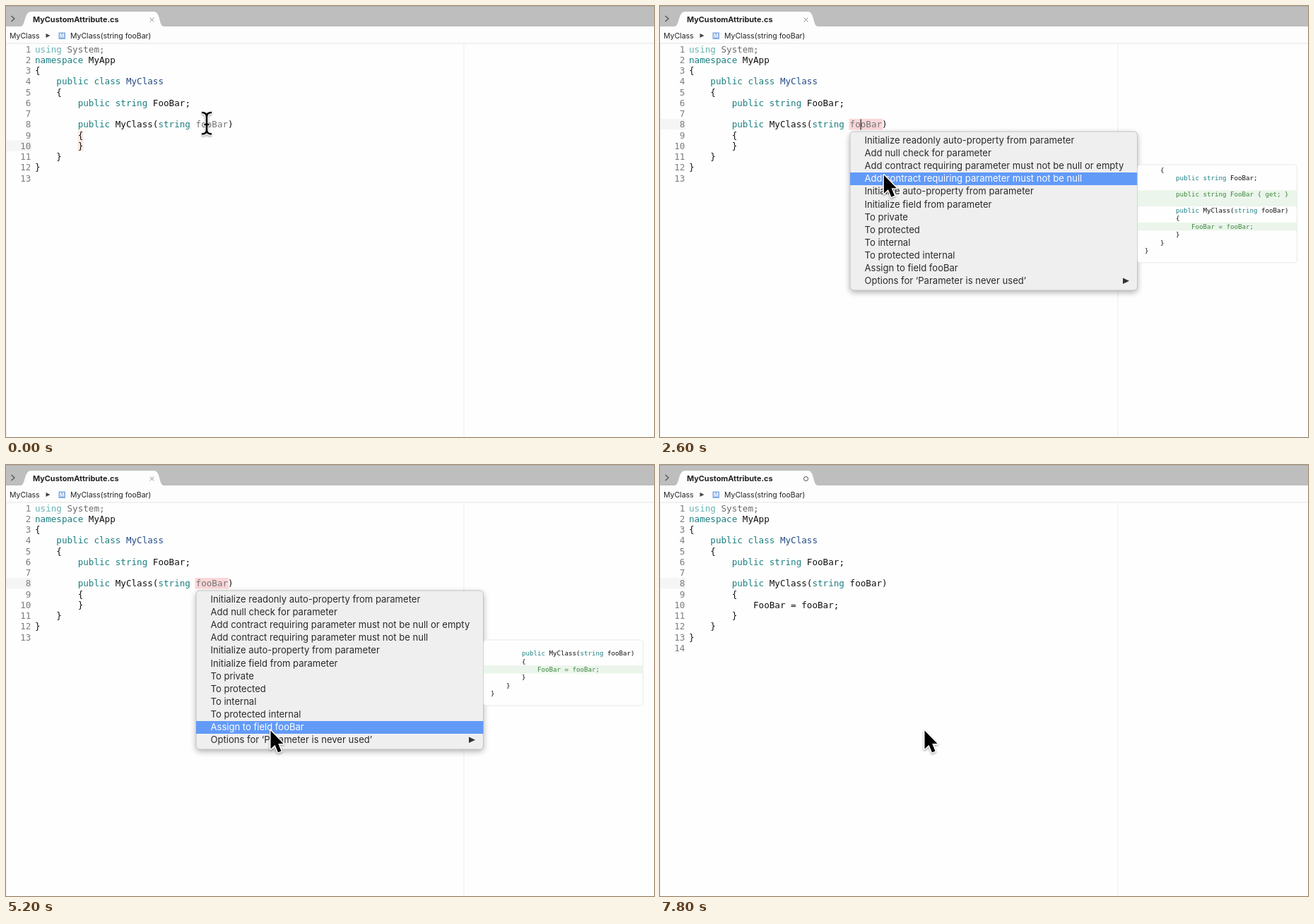
Recreate the animation shown at these times as an HTML page with a canvas. Size 917 px wide and 611 px high, loop 8 s.

```html
<!DOCTYPE html>
<html lang="en">
<head>
<meta charset="utf-8">
<title>Code fix menu</title>
<style>
html, body { margin: 0; width: 100%; height: 100%; overflow: hidden; background: #fdfefd; }
canvas { display: block; width: 917px; height: 611px; }
</style>
</head>
<body>
<canvas id="stage"></canvas>
<script>
const W = 917, H = 611, LOOP = 8000, STEP = 200;
const canvas = document.getElementById('stage');
const c = canvas.getContext('2d');
const ratio = window.devicePixelRatio || 1;
canvas.width = W * ratio;
canvas.height = H * ratio;

const UI = 'Inter, "Open Sans", sans-serif';
const MONO = '"DejaVu Sans Mono", monospace';
const TEAL = '#1d7e80', GRAY = '#757575', GREEN = '#3c873f', RED = '#8c2226';
const KEYWORD = /^(using|namespace|public|class|string|protected|internal)$/;

const CODE_X = 41, CODE_SIZE = 12.6, ADVANCE = 0.602;
const col = n => CODE_X + n * CODE_SIZE * ADVANCE;
const row = n => 61.2 + (n - 1) * 15.25;

const SIGNATURE = 'public MyClass(string fooBar)';
const HEAD = ['using System;', 'namespace MyApp', '{', '    public class MyClass', '    {',
  '        public string FooBar;', '', '        ' + SIGNATURE, '        {'];
const TAIL = ['        }', '    }', '}', ''];
const ASSIGN = '            FooBar = fooBar;';

const ITEMS = ['Initialize readonly auto-property from parameter', 'Add null check for parameter',
  'Add contract requiring parameter must not be null or empty',
  'Add contract requiring parameter must not be null',
  'Initialize auto-property from parameter', 'Initialize field from parameter',
  'To private', 'To protected', 'To internal', 'To protected internal',
  'Assign to field fooBar', 'Options for ‘Parameter is never used’'];
const MENU = { x: 269, y: 178, w: 406.5, h: 225, first: 181.4, pitch: 18.14 };

// A leading + or - marks an added or removed line.
const PREVIEWS = {
  property: ['    {', '        public string FooBar;', '', '+        public string FooBar { get; }', '+',
    '        ' + SIGNATURE, '        {', '+' + ASSIGN, '        }', '    }', '}'],
  modifier: ['{', '    public string FooBar;', '', '-    ' + SIGNATURE,
    '+    protected internal MyClass(string fooBar)', '    {', '    }', '}'],
  field: ['', '        ' + SIGNATURE, '        {', '+' + ASSIGN, '        }', '    }', '}']
};

function rect(x, y, w, h, color) {
  c.fillStyle = color;
  c.fillRect(x, y, w, h);
}

function label(text, x, y, font, color, align = 'left') {
  c.font = font;
  c.fillStyle = color;
  c.textAlign = align;
  c.fillText(text, x, y);
}

function shape(points, color) {
  c.beginPath();
  points.forEach(([x, y]) => c.lineTo(x, y));
  c.closePath();
  c.fillStyle = color;
  c.fill();
}

function box(x, y, w, h, r, fill, border) {
  c.beginPath();
  c.roundRect(x, y, w, h, r);
  c.fillStyle = fill;
  c.fill();
  c.shadowColor = 'transparent';
  c.strokeStyle = border;
  c.lineWidth = 1;
  c.stroke();
}

function shadow(color, blur, dy) {
  c.shadowColor = color;
  c.shadowBlur = blur * ratio;
  c.shadowOffsetY = dy * ratio;
}

function code(text, x, y, size, colorOf = () => null) {
  let at = 0;
  for (const part of text.split(/(\w+)/)) {
    const color = colorOf(part) || (KEYWORD.test(part) ? TEAL : '#111');
    if (part.trim()) label(part, x + at * size * ADVANCE, y, size + 'px ' + MONO, color);
    at += part.length;
  }
}

function drawChrome(dirty) {
  rect(0, 0, W, H, '#fdfefd');
  rect(0, 53, 1, H, '#f0f0f0');
  rect(647.5, 53, 1, H, '#ebebeb');
  rect(0, 0, W, 29, '#bebebe');
  rect(0, 0, W, 1, '#adadad');
  rect(0, 29, W, 24, '#fdfdfd');
  rect(0, 52.5, W, 1, '#e6e6e6');

  c.beginPath();
  c.moveTo(21, 29);
  c.bezierCurveTo(28, 28, 25, 8, 36, 8);
  c.lineTo(209, 8);
  c.bezierCurveTo(219, 8, 216, 28, 223, 29);
  c.fillStyle = '#fdfdfd';
  c.fill();

  c.strokeStyle = '#555';
  c.lineWidth = 1.3;
  c.beginPath();
  c.moveTo(7.5, 14);
  c.lineTo(12, 18);
  c.lineTo(7.5, 22);
  c.stroke();
  label('MyCustomAttribute.cs', 38, 23, 'bold 10.9px ' + UI, '#222');

  c.beginPath();
  if (dirty) c.arc(206.5, 19.5, 3, 0, 7);
  else for (const s of [-1, 1]) {
    c.moveTo(203.7, 19.5 - s * 2.8);
    c.lineTo(209.3, 19.5 + s * 2.8);
  }
  c.lineWidth = 1;
  c.strokeStyle = dirty ? '#444' : '#888';
  c.stroke();

  const crumb = '10.5px ' + UI;
  label('MyClass', 5, 46, crumb, '#222');
  shape([[56.5, 39], [62.5, 42], [56.5, 45]], '#444');
  rect(74.5, 37.5, 9.5, 9.5, '#82abe2');
  label('M', 79.2, 45.2, 'bold 7.5px ' + UI, '#fff', 'center');
  label('MyClass(string fooBar)', 91, 46, crumb, '#222');
}

function drawCode(t) {
  const applied = t >= 6600, clicked = t >= 800;
  const lines = applied ? [...HEAD, ASSIGN, ...TAIL] : [...HEAD, ...TAIL];
  const current = clicked ? 8 : 10;
  rect(1, row(current) - 8, 35.5, 15.25, '#f5f5f5');
  if (!clicked) for (const n of [9, 10]) rect(col(8), row(n) - 7.5, 8, 15, '#fbeae3');
  if (t >= 1000 && !applied) rect(267.5, row(8) - 8, 47.5, 15.5, '#fbd6d8');

  lines.forEach((text, i) => {
    const n = i + 1, y = row(n) + 4.5;
    label(n, 35.4, y, CODE_SIZE + 'px ' + MONO, '#7c7d7f', 'right');
    code(text, CODE_X, y, CODE_SIZE, part => {
      if (n === 1) return part === 'using' ? '#6ab3b4' : '#6a6a6a';
      if (n === 4 && part === 'MyClass') return '#254a85';
      if (n === 8 && part === 'fooBar' && t < 7400) return GRAY;
    });
  });
  if (clicked && (t + 200) % 1200 < 600) rect(283.6, row(8) - 7.5, 1.2, 15, '#222');
}

function drawPreview(lines) {
  const size = 9.14, pitch = 11.45, x = 676;
  const plain = lines.map(s => s.replace(/^[+-]/, ''));
  const w = 22 + Math.max(...plain.map(s => s.length)) * size * ADVANCE;
  const h = 13 + lines.length * pitch, top = 294.5 - h / 2;
  box(x, top, w, h, 4, '#fefefe', '#e9e9e9');
  lines.forEach((s, i) => {
    const y = top + 7.5 + i * pitch;
    const ink = { '+': GREEN, '-': RED }[s[0]];
    if (ink) rect(x, y - 5.7, w, pitch, ink === GREEN ? '#ebf5eb' : '#fbf2f2');
    code(plain[i], x + 10, y + 3.2, size, () => ink);
  });
}

function drawMenu(selected, alpha) {
  const { x, y, w, h, first, pitch } = MENU;
  c.save();
  c.globalAlpha = alpha;
  shadow('rgba(0,0,0,.32)', 9, 3);
  box(x, y, w, h, 5, '#efeff0', '#c4c4c4');
  rect(x, Math.round(first + selected * pitch), w, 18, '#629af8');
  ITEMS.forEach((text, i) => {
    label(text, 289.5, 194.8 + i * pitch, '13.05px ' + UI, i === selected ? '#fff' : '#2a2a2a');
  });
  shape([[655, 385.5], [664, 389.8], [655, 394]], '#333');
  c.restore();
}

function outlined(path, fillIt) {
  c.save();
  c.lineJoin = 'round';
  shadow('rgba(0,0,0,.35)', 3, 1.5);
  c.strokeStyle = '#fff';
  c.lineWidth = fillIt ? 3 : 5;
  c.stroke(path);
  c.shadowColor = 'transparent';
  c.fillStyle = c.strokeStyle = '#000';
  c.lineWidth = 2.6;
  if (fillIt) c.fill(path);
  else c.stroke(path);
  c.restore();
}

function drawPointer(x, y) {
  c.save();
  c.translate(x, y);
  outlined(new Path2D('M.5 .5V26.5L6.5 20.8 11 31.5 15.5 29.5 11.2 19H18.5Z'), true);
  c.restore();
}

function drawBeam() {
  outlined(new Path2D('M277 151Q284 151 284 157Q284 151 291 151M284 156V176' +
    'M277 181.5Q284 181.5 284 175.5Q284 181.5 291 181.5M280.5 168H287.5'), false);
}

function ease(t, from, to) {
  const p = Math.min(1, Math.max(0, (t - from) / (to - from)));
  return p * p * (3 - 2 * p);
}

function draw(t) {
  const down = ease(t, 2300, 3000), settle = ease(t, 3000, 3500);
  const x = 283.5 + 83.5 * down + 7 * settle;
  const y = 166 + 186 * down + 24 * settle;
  const selected = Math.max(0, Math.floor((y - MENU.first) / MENU.pitch));

  c.setTransform(ratio, 0, 0, ratio, 0, 0);
  drawChrome(t >= 6600);
  drawCode(t);
  if (t >= 1600 && t < 6200) drawMenu(selected, t < 6000 ? 1 : 0.07);
  // The preview sits above the menu's shadow.
  if (t >= 1800 && t < 6400) {
    drawPreview(PREVIEWS[t < 3000 ? 'property' : t < 3400 ? 'modifier' : 'field']);
  }
  if (t < 1600) drawBeam();
  else drawPointer(x, y);
}

const start = performance.now();
function tick() {
  const t = (performance.now() - start) % LOOP;
  draw(Math.floor(t / STEP) * STEP);
  requestAnimationFrame(tick);
}
tick();
</script>
</body>
</html>
```
